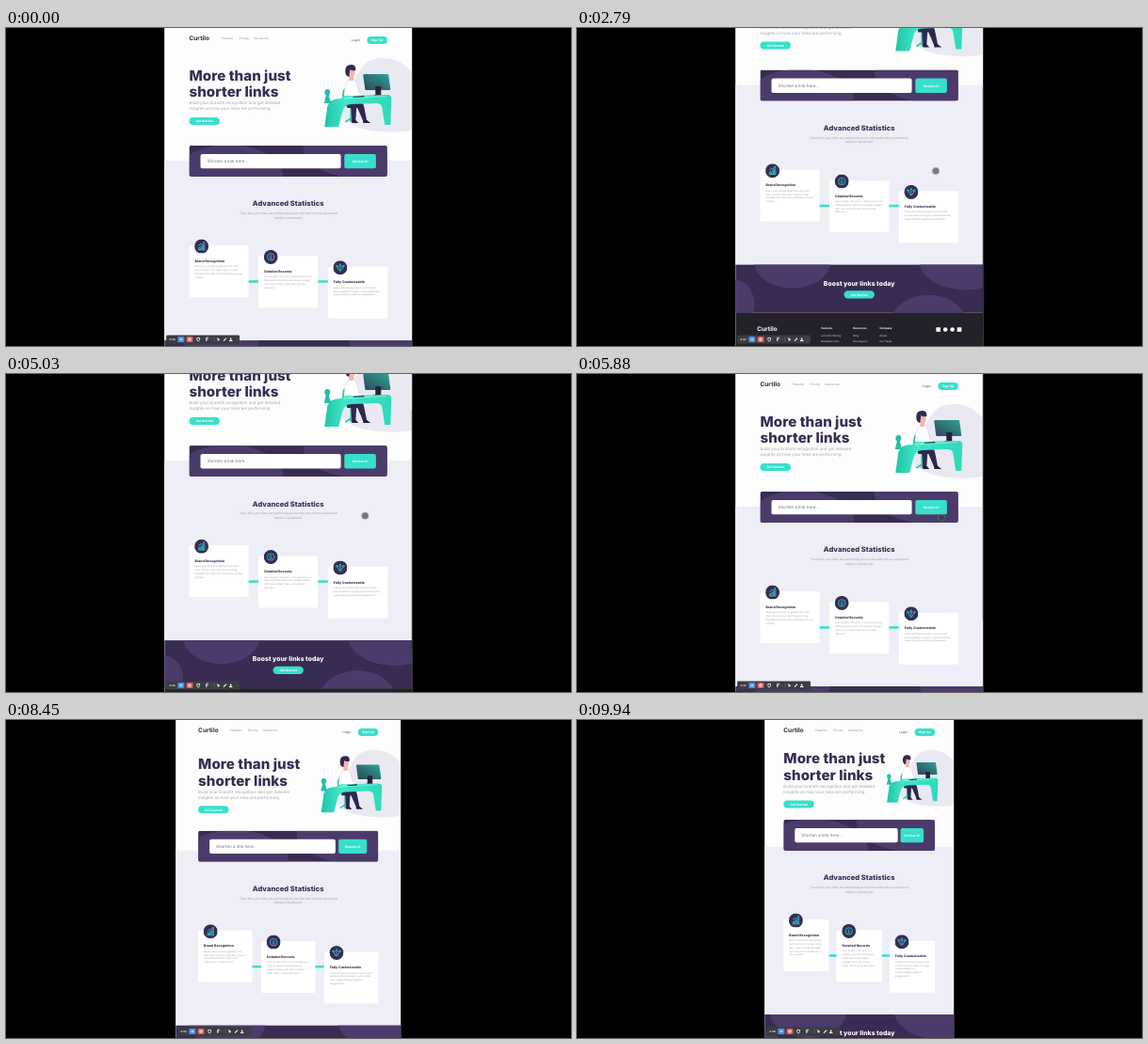
An HTML page for the animation above (10000 ms loop, 600 by 338 pixels).

```html
<!DOCTYPE html>
<html lang="en">
<head>
<meta charset="utf-8">
<title>Landing page recording</title>
<style>
@property --w { syntax: "<length>"; inherits: true; initial-value: 2630px; }
@property --y { syntax: "<length>"; inherits: true; initial-value: 0px; }
@property --sec { syntax: "<integer>"; inherits: true; initial-value: 0; }

/* 1rem is one stage pixel: laid out ten times larger, then scaled down */
html { font-size: 10px; }
html, body { margin: 0; width: 600px; height: 338px; overflow: hidden; background: #000; }
.stage {
  position: absolute; width: 600rem; height: 338rem; overflow: hidden;
  transform: scale(.1); transform-origin: 0 0;
  font-family: Inter, "Open Sans", sans-serif; text-rendering: geometricPrecision;
  --ink: #382c53; --teal: #38dfcb; --lilac: #4a3b6a;
}
.stage * { box-sizing: border-box; }
.stage div, .stage p, .stage h1, .stage h2, .stage h3, .stage svg, .stage ul { position: absolute; margin: 0; }
.win {
  --d: calc((263rem - var(--w)) * .306);
  left: calc(299.7rem - var(--w) / 2); width: var(--w); height: 338rem;
  overflow: hidden; background: #fdfdfe;
  animation: resize 10s linear infinite, scroll 10s infinite, tick 10s steps(10) -.03s infinite;
}
.page { top: calc(-1 * var(--y)); width: 100%; height: 437rem; }
.band { top: calc(141rem - (263rem - var(--w)) * .1); bottom: 0; width: 100%; background: #eeeef6; }
.wrap { left: 10%; width: 80%; }
.copy { top: calc(var(--d) / -2); }
.low { top: calc(-1 * var(--d)); width: 100%; }

.t { line-height: 6rem; white-space: nowrap; }
.nav { top: 7.8rem; font-size: 3.1rem; color: #8f8b9b; }
.logo { font-size: 6.5rem; font-weight: 700; color: #2e2840; }
.btn {
  display: flex; align-items: center; justify-content: center; white-space: nowrap;
  background: var(--teal); color: #fff; font-weight: 700; font-size: 3.3rem; border-radius: 5rem;
}
h1, h2, h3 { color: var(--ink); font-weight: 800; white-space: nowrap; }
h1 { top: 41.3rem; font-size: 15.2rem; line-height: 17.6rem; }
h2 { width: 100%; text-align: center; font-size: 7.6rem; line-height: 10rem; }
h3 { left: 6rem; top: 13.5rem; font-size: 3.5rem; line-height: 6rem; }
.lead { top: 76.7rem; font-size: 4.4rem; line-height: 6rem; color: #a5a2ae; white-space: nowrap; }
.sub { top: 195.2rem; width: 100%; text-align: center; font-size: 3.1rem; line-height: 4.2rem; color: #9b98a8; white-space: nowrap; }
.art { right: 0; top: 32rem; width: 36.1%; }

.panel {
  top: 125rem; height: 33rem; border-radius: 2rem;
  background:
    radial-gradient(ellipse 58rem 34rem at 20% 33rem, var(--lilac) 99%, #0000),
    radial-gradient(ellipse 64rem 32rem at 88% 3rem, var(--lilac) 99%, #0000), var(--ink);
}
.panel div { top: 9rem; height: 15.3rem; border-radius: 2rem; }
.field { left: 12rem; width: calc((100% - 24rem) * .8); background: #fff; padding-left: 7rem; font-size: 4.5rem; line-height: 15rem; color: #6f6b7c; white-space: nowrap; }
.go { right: 12rem; width: calc((100% - 24rem) * .18); }

.link { top: 268.2rem; left: 15%; width: 70%; height: 2.5rem; background: var(--teal); }
.card { width: 30%; height: 55rem; background: #fff; border-radius: 1.4rem; }
.card p { left: 6rem; right: 5.5rem; top: 20.4rem; font-size: 2.5rem; line-height: 3.8rem; color: #aaa7b4; }
.card svg { left: 5.6rem; top: -6.4rem; width: 15rem; height: 15rem; fill: none; stroke: #35cfd2; stroke-width: .8; }
.card circle.disc { fill: var(--ink); stroke: none; }

.boost {
  top: 332rem; width: 100%; height: 51rem;
  background:
    radial-gradient(ellipse 41rem 29rem at 23% -4rem, var(--lilac) 99%, #0000),
    radial-gradient(ellipse 20rem 26rem at 0 42rem, var(--lilac) 99%, #0000),
    radial-gradient(ellipse 50rem 32rem at 93% -5rem, var(--lilac) 99%, #0000),
    radial-gradient(ellipse 42rem 34rem at 78% 66rem, var(--lilac) 99%, #0000), var(--ink);
}
.boost h2 { top: 14.8rem; font-size: 6.9rem; color: #fff; }
.foot { top: 383rem; width: 100%; height: 80rem; background: #242128; color: #fff; }
.foot ul { top: 13.6rem; padding: 0; list-style: none; font-size: 2.85rem; line-height: 5.8rem; color: #cfccd6; white-space: nowrap; }
.foot li:first-child { font-weight: 700; color: #fff; margin-bottom: 2.4rem; }
.foot i { position: absolute; top: 15.6rem; width: 4.6rem; height: 4.6rem; background: #fff; }
.foot i.dot { border-radius: 50%; }

.thumb {
  right: 0; top: calc(var(--y) * .7735); width: .8rem; height: 261rem;
  border-radius: 1rem; background: #0004; animation: thumb 10s step-end infinite;
}
.bar { left: 2rem; top: 326.4rem; width: 77.8rem; height: 9rem; border-radius: 1rem; background: #3b3c43; }
.bar svg { width: 100%; height: 100%; }
.time { left: 3.4rem; top: 1.5rem; font-size: 2.6rem; font-weight: 700; color: #fff; }
.time::after { counter-reset: s var(--sec); content: "0:0" counter(s); }
.cursor {
  left: -3.8rem; top: -3.8rem; width: 7.6rem; height: 7.6rem; border-radius: 50%;
  background: #3c3c3ca8; border: .5rem solid #a0a0a0a0; animation: point 10s infinite;
}

@keyframes resize {
  0%, 74% { --w: 263rem; }
  77.6% { --w: 252rem; }
  84.5% { --w: 239rem; }
  94.8% { --w: 217rem; }
  99.4%, 100% { --w: 201rem; }
}
@keyframes scroll {
  0%, 13.2% { --y: 0rem; animation-timing-function: cubic-bezier(.25, .6, .3, 1); }
  18.2%, 20.6% { --y: 23.5rem; animation-timing-function: cubic-bezier(.25, .6, .3, 1); }
  23.9%, 25.8% { --y: 58rem; animation-timing-function: cubic-bezier(.25, .6, .3, 1); }
  35.2%, 44.5% { --y: 99rem; animation-timing-function: cubic-bezier(.3, .5, .4, 1); }
  53.3%, 53.6% { --y: 45rem; animation-timing-function: cubic-bezier(.25, .6, .3, 1); }
  58.7%, 100% { --y: 0rem; }
}
@keyframes tick { from { --sec: 0; } to { --sec: 10; } }
@keyframes thumb { 0% { opacity: 0; } 13.3% { opacity: 1; } 61.8%, 100% { opacity: 0; } }
@keyframes point {
  0%, 2.69% { transform: translate(422rem, 12rem); opacity: 0; }
  2.7% { transform: translate(422rem, 12rem); opacity: 1; }
  7.9%, 9.7% { transform: translate(383rem, 147rem); }
  11.2%, 36.3% { transform: translate(381rem, 152rem); }
  36.4%, 53.6% { transform: translate(381.3rem, 150.8rem); }
  58.7%, 63.6% { transform: translate(387rem, 152.6rem); }
  69.9% { transform: translate(430rem, 150rem); opacity: 1; }
  70%, 100% { transform: translate(430rem, 150rem); opacity: 0; }
}
</style>
</head>
<body>
<div class="stage">
  <div class="win">
    <div class="page">
      <div class="band"></div>

      <svg class="art" viewBox="0 0 95 80">
        <defs>
          <linearGradient id="desk" x1="0" x2="1"><stop stop-color="#22c3a6"/><stop offset=".3" stop-color="#3fe6c6"/><stop offset="1" stop-color="#2fd9ba"/></linearGradient>
          <linearGradient id="screen" x1="0" y1="1" x2="1" y2="0"><stop stop-color="#2d4358"/><stop offset="1" stop-color="#2fa596"/></linearGradient>
        </defs>
        <path fill="#e9e9f2" d="M64 0C46 0 42 9 35 20 27 32 13 46 18 59c6 12 24 18 43 19 14 1 27 1 35-2V17C88 6 78 0 64 0Z"/>
        <!-- chair -->
        <path fill="#27bfa5" d="M21 44q-1-11 3-12q4 0 5 16h9v3H24q-3 0-3-7Z"/>
        <path fill="none" stroke="#27bfa5" stroke-width="1.600" d="M30 50V64M24 68l6-4 6 4M30 64v4"/>
        <!-- person -->
        <path fill="#2f2850" d="M25 46h13q5 0 6 6l3 15h-4l-6-14H26ZM36 51l-1 16h-4l-1-16Z"/>
        <path fill="#231e38" d="M43 66h4l4 3h-8ZM31 66h4l3 3h-7Z"/>
        <path fill="#fff" stroke="#c9c7da" stroke-width=".5" d="M24 30q2-8 7-7 5 0 6 7l2 7 6 4-1 3-9-2v5H23q-1-10 1-17Z"/>
        <path fill="#f1b9ac" d="M28 14h5v9q-3 2-5 0Z"/>
        <ellipse cx="31" cy="15.500" rx="3.300" ry="4.400" fill="#f1b9ac"/>
        <path fill="#33284f" d="M35 13q-4 1-6-1l-1 8q-4-1-4-6 0-7 6-7 6 0 5 6Z"/>
        <!-- monitor -->
        <path fill="url(#screen)" d="M43 18q0-1 1-1h25q1 0 1 1l2 15q0 1-1 1H46q-1 0-1-1Z"/>
        <path fill="#29233f" d="M56 30h6v11h-9q0-2 3-2Z"/>
        <!-- desk -->
        <path fill="url(#desk)" d="M20 43q2-4 9-3l40-1q4 0 4 4l-1 28h-6l-3-19q-1-4-6-4l-26 1q-8 0-10 8l-4 16H2l3-22q2-8 15-8Z"/>
        <path fill="#fff" opacity=".35" d="M22 44q2-3 8-3l38-1v1l-37 2Z"/>
        <path fill="#29233f" d="M32 41l12-1v1.200l-11 .6Z"/>
        <path fill="#27bfa5" d="M5 33q3 0 3 3.500 0 2-1.400 3L9 48H1.500l2-8.500Q2 38.500 2 36.500 2 33 5 33Z"/>
      </svg>

      <div class="wrap">
        <div class="t logo" style="top:7.3rem">Curtilo</div>
        <div class="t nav" style="left:34rem">Features</div>
        <div class="t nav" style="left:53rem">Pricing</div>
        <div class="t nav" style="left:69rem">Resources</div>
        <div class="t" style="right:29rem;top:10rem;font-size:3.5rem;color:#55506a">Login</div>
        <div class="btn" style="right:0;top:9rem;width:21.5rem;height:8rem">Sign Up</div>
        <div class="copy">
          <h1>More than just<br>shorter links</h1>
          <p class="lead">Build your brand’s recognition and get detailed<br>insights on how your links are performing.</p>
          <div class="btn" style="top:95rem;width:32.4rem;height:8rem">Get Started</div>
        </div>
      </div>

      <div class="low">
        <div class="wrap panel">
          <div class="field">Shorten a link here...</div>
          <div class="btn go">Shorten It!</div>
        </div>
        <h2 style="top:181.700rem">Advanced Statistics</h2>
        <p class="sub">Track how your links are performing across the web with our advanced<br>statistics dashboard.</p>
        <div class="wrap">
          <div class="link"></div>
          <div class="card" style="top:231rem">
            <svg viewBox="0 0 15 15"><circle class="disc" cx="7.500" cy="7.500" r="7.500"/><path d="M3.800 11.300h7.600M4.500 11V8.800h1.400V11M6.900 11V7.300h1.400V11M9.300 11V5.600h1.400V11M4.300 6.800 7 4.800l1 .8 2.600-2.200M9.200 3.300h1.500v1.400"/></svg>
            <h3>Brand Recognition</h3>
            <p>Boost your brand recognition with each click. Generic links don’t mean a thing. Branded links help instil confidence in your content.</p>
          </div>
          <div class="card" style="top:242.300rem;left:35%">
            <svg viewBox="0 0 15 15"><circle class="disc" cx="7.500" cy="7.500" r="7.500"/><circle cx="7.500" cy="7.500" r="3.700"/><path d="M7.500 9V5.300M6.300 9.300h2.400M5.300 7.500h.6M9.100 7.500h.6"/></svg>
            <h3>Detailed Records</h3>
            <p>Gain insights into who is clicking your links. Knowing when and where people engage with your content helps inform better decisions.</p>
          </div>
          <div class="card" style="top:253.700rem;left:70%">
            <svg viewBox="0 0 15 15"><circle class="disc" cx="7.500" cy="7.500" r="7.500"/><path d="M7.500 11.500V6.500M6.500 5.500 7.500 3.400l1 2.100-1 1.200ZM7 11 4.700 7.500M8 11l2.300-3.500M3.300 5l2 .7-.4 1.600-1.400-.8ZM11.700 5l-2 .7.400 1.600 1.400-.8Z"/></svg>
            <h3>Fully Customizable</h3>
            <p>Improve brand awareness and content discoverability through customizable links, supercharging audience engagement.</p>
          </div>
        </div>

        <div class="boost">
          <h2>Boost your links today</h2>
          <div class="btn" style="left:calc(50% - 16.2rem);top:27.6rem;width:32.4rem;height:8.3rem">Get Started</div>
        </div>
        <div class="foot">
          <div class="t logo" style="left:23rem;top:14.3rem;color:#fff">Curtilo</div>
          <ul style="left:91rem"><li>Features<li>Link Shortening<li>Branded Links<li>Analytics</ul>
          <ul style="left:125rem"><li>Resources<li>Blog<li>Developers<li>Support</ul>
          <ul style="left:153rem"><li>Company<li>About<li>Our Team<li>Careers<li>Contact</ul>
          <i style="right:45.2rem"></i><i class="dot" style="right:37.7rem"></i>
          <i class="dot" style="right:30.3rem"></i><i style="right:22.9rem"></i>
        </div>
      </div>
    </div>

    <div class="thumb"></div>
    <div class="bar">
      <div class="t time"></div>
      <svg viewBox="0 0 77.800 9" fill="none" stroke="#fff" stroke-width=".8">
        <rect x="12.200" y="1.700" width="7" height="5.800" rx="1" fill="#4a90e8" stroke="none"/>
        <rect x="21.300" y="1.700" width="7" height="5.800" rx="1" fill="#e8564f" stroke="none"/>
        <path d="M14.900 3.500v2.200M16.500 3.500v2.200M23.700 3.500h2.200v2.200h-2.200Z"/>
        <path d="M32.600 3h2.800v1.900q0 1.100-1.400 1.700-1.400-.6-1.400-1.700ZM42.600 6.700V2.800h2.400M41.800 4.600h2.400"/>
        <path stroke="#777980" stroke-width=".6" d="M46.700 4.300l.8.800.8-.8M51 2v5M74.300 4.300l.8.800.8-.8"/>
        <path fill="#fff" stroke="none" d="M54 2.400l3.200 2.800-1.500.2-.9 1.500Z"/>
        <path stroke-width="1.100" d="M60.800 6.300l3-3"/>
        <path fill="#fff" stroke="none" d="M68.500 2.500l1.300 2.500h-2.600ZM66.800 5.500h3.400v1.200h-3.400Z"/>
      </svg>
    </div>
  </div>
  <div class="cursor"></div>
</div>
</body>
</html>
```
